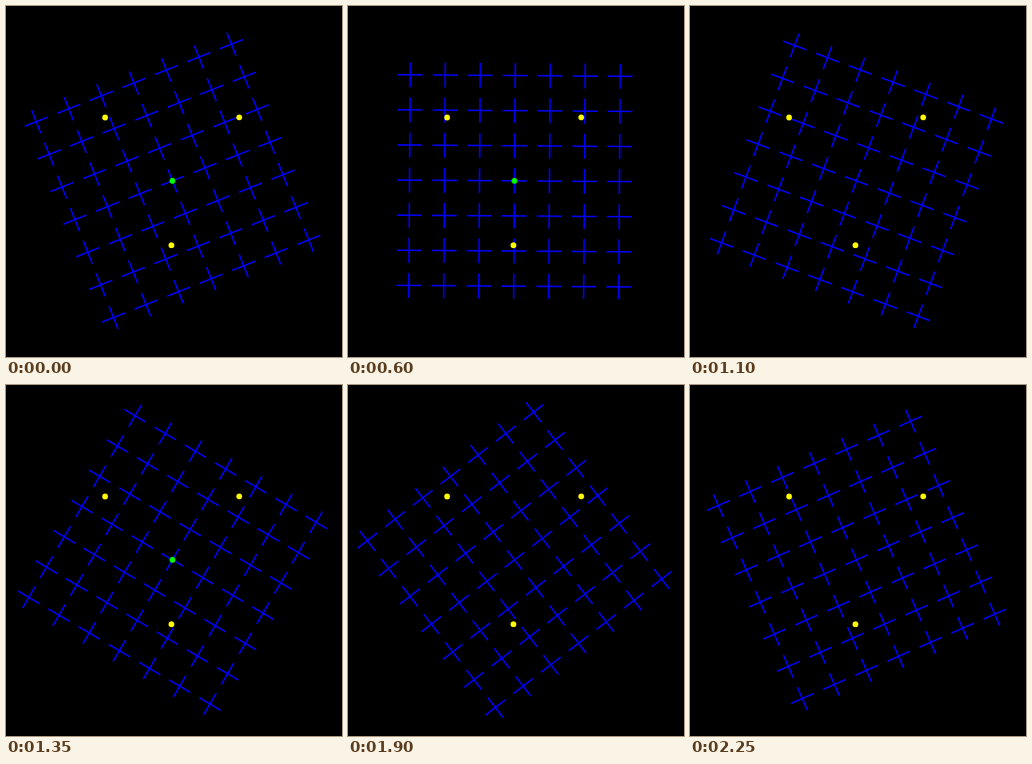
An HTML page that plays this animation: 461x480 px, repeating every 2.3 s.

```html
<!DOCTYPE html>
<html lang="en">
<head>
<meta charset="utf-8">
<title>Rotating grid</title>
<style>
  html, body { margin: 0; width: 100%; height: 100%; overflow: hidden; background: #000; }
  svg { display: block; }
  /* The small negative delay keeps steps clear of rounding at their edges. */
  .grid {
    fill: none; stroke: #00f; stroke-width: 2;
    stroke-dasharray: 34 14;
    animation: turn 2300ms -2ms infinite;
  }
  .blink { fill: #0f0; animation: blink 2300ms -2ms step-end infinite; }
  .dots { fill: #ff0; }

  /* The first pose is held for 100 ms, then 2 degrees every 50 ms. */
  @keyframes turn {
    0% { transform: rotate(-21.6deg); animation-timing-function: step-end; }
    4.34783% { transform: rotate(-19.6deg); animation-timing-function: steps(44, end); }
    100% { transform: rotate(68.4deg); }
  }
  @keyframes blink {
    0%, 19.5652%, 36.9565%, 54.3478%, 71.7391%, 89.1304% { opacity: 1; }
    10.8696%, 28.2609%, 45.6522%, 63.0435%, 80.4348%, 97.8261%, 100% { opacity: 0; }
  }
</style>
</head>
<body>
<svg width="461" height="480" viewBox="0 0 461 480">
  <g transform="translate(228.4 239.1)">
    <g class="grid">
      <path id="rows" d="M-161-144h322M-161-96h322M-161-48h322M-161 0h322M-161 48h322M-161 96h322M-161 144h322"/>
      <use href="#rows" transform="rotate(90)"/>
    </g>
    <circle class="blink" r="3.9"/>
  </g>
  <g class="dots">
    <circle cx="136" cy="152.5" r="3.9"/>
    <circle cx="320" cy="152.3" r="3.9"/>
    <circle cx="227" cy="327.2" r="3.9"/>
  </g>
</svg>
</body>
</html>
```
